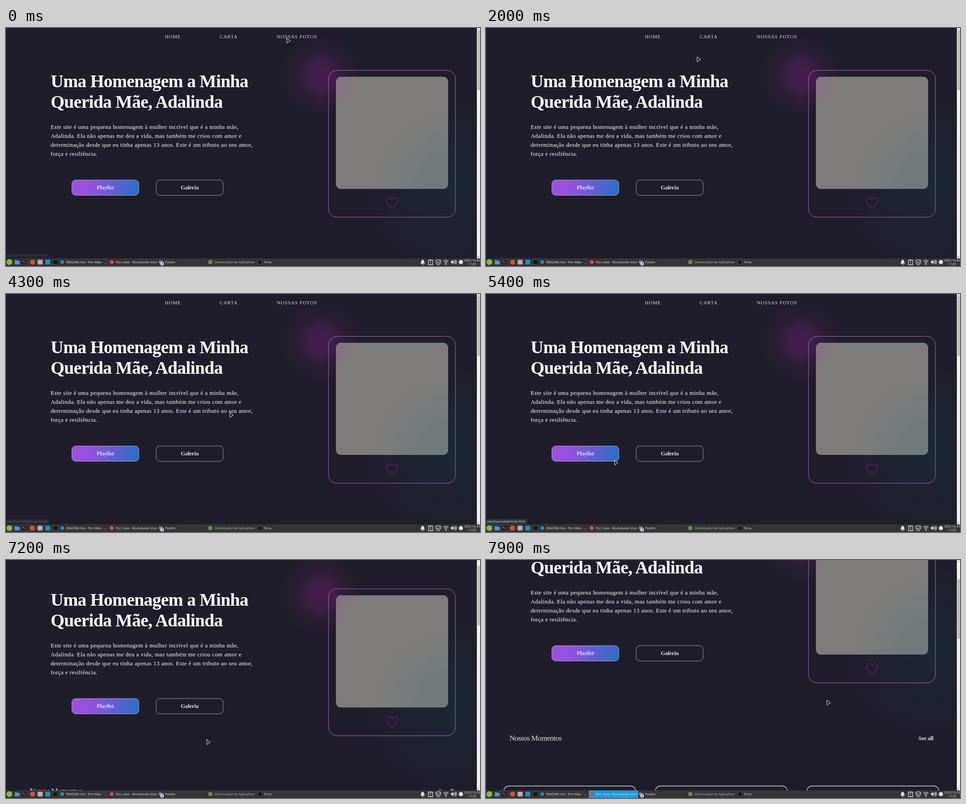
An HTML page that plays this animation: 1056 px wide and 531 px high, repeating every 8 s.

```html
<!DOCTYPE html>
<html lang="pt-BR">
<head>
<meta charset="utf-8">
<style>
html, body { margin: 0; width: 100%; height: 100%; overflow: hidden; background: #201d2b; }
svg { display: block; width: 1056px; height: 531px; }
text { white-space: pre; }
#page { font-family: "Liberation Serif", "Times New Roman", serif; fill: #fff; }
.title { font-size: 39.6px; font-weight: bold; letter-spacing: -.77px; }
.body { font-size: 13.2px; letter-spacing: .365px; }
.link { font-size: 11px; letter-spacing: .9px; fill: #ddd; }
.link.on { fill: #ee82ee; text-decoration: underline; }
.label { font-size: 13.2px; font-weight: bold; letter-spacing: -.4px; fill: #dcd8dd; }
.mid { text-anchor: middle; }
.btn rect { stroke: #d5d3d8; stroke-width: .7; }
.btn.on rect { stroke: #ee82ee; }
.head { font-size: 17px; letter-spacing: -.67px; fill: #ddd; }
#bar, #status { font-family: "Noto Sans", "Open Sans", sans-serif; font-size: 7.2px; fill: #d6d6d6; }
#status { font-family: "Open Sans", "Noto Sans", sans-serif; font-size: 7.1px; }
.clock { font-size: 6.8px; }
.tray { fill: none; stroke: #dedede; stroke-width: 1.3; }
#cursor path { fill: #15131b; stroke: #fff; stroke-width: 1; stroke-linejoin: round; }
</style>
</head>
<body>
<svg viewBox="0 0 1056 531">
  <defs>
    <linearGradient id="fill" gradientUnits="userSpaceOnUse" x1="181" y1="350" x2="287" y2="370">
      <stop stop-color="#9b50e1"/><stop offset="1" stop-color="#306dc8"/>
    </linearGradient>
    <radialGradient id="pink">
      <stop stop-color="#be28be" stop-opacity=".24"/>
      <stop offset="0.3" stop-color="#be28be" stop-opacity=".2"/>
      <stop offset="0.62" stop-color="#be28be" stop-opacity=".07"/>
      <stop offset="1" stop-color="#be28be" stop-opacity="0"/>
    </radialGradient>
    <radialGradient id="teal">
      <stop stop-color="#0a5f82" stop-opacity=".12"/>
      <stop offset="0.3" stop-color="#0a5f82" stop-opacity=".1"/>
      <stop offset="0.65" stop-color="#0a5f82" stop-opacity=".04"/>
      <stop offset="1" stop-color="#0a5f82" stop-opacity="0"/>
    </radialGradient>
  </defs>
  <rect width="1056" height="531" fill="#201d2b"/>

  <g id="page">
    <text class="link" id="home" x="354" y="23.4">HOME</text>
    <text class="link" id="letter" x="476" y="23.4">CARTA</text>
    <text class="link" id="photos" x="603" y="23.4">NOSSAS FOTOS</text>
    <text class="title" x="99.6" y="132.3">Uma Homenagem a Minha</text>
    <text class="title" x="99.6" y="178.1">Querida Mãe, Adalinda</text>
    <g class="body">
      <text x="99.4" y="224.6">Este site é uma pequena homenagem à mulher incrível que é a minha mãe,</text>
      <text x="99.4" y="244.8">Adalinda. Ela não apenas me deu a vida, mas também me criou com amor e</text>
      <text x="99.4" y="265">determinação desde que eu tinha apenas 13 anos. Este é um tributo ao seu amor,</text>
      <text x="99.4" y="285.2">força e resiliência.</text>
    </g>
    <g class="btn" id="playlist">
      <rect x="146.7" y="339.1" width="149.2" height="34.2" rx="8.5" fill="url(#fill)"/>
      <text class="label mid" x="221.3" y="359.8">Playlist</text>
    </g>
    <g class="btn" id="gallery">
      <rect x="334.5" y="339.1" width="149.2" height="34.2" rx="8.5" fill="none"/>
      <text class="label mid" x="409" y="359.8">Galeria</text>
    </g>
    <rect x="735" y="108.7" width="250" height="250.3" rx="11" fill="#7e7c7a"/>
    <circle cx="702" cy="106" r="88" fill="url(#pink)"/>
    <circle cx="985" cy="350" r="190" fill="url(#teal)"/>
    <rect x="718.6" y="94.5" width="282.6" height="327.6" rx="19" fill="none" stroke="#dc86e0" stroke-width=".75"/>
    <path d="M860 402C852 396 847.3 392 847.3 386.5C847.3 378.5 857 377 860 384C863 377 872.7 378.5 872.7 386.5C872.7 392 868 396 860 402Z" fill="none" stroke="#4b1d5d" stroke-width="2.5" stroke-linejoin="round"/>
    <text class="head" x="52.2" y="550.6">Nossos Momentos</text>
    <text class="label" x="963.3" y="549.6">See all</text>
    <g fill="none" stroke="#f4f4f4" stroke-width="1.1">
      <rect x="39.5" y="652.4" width="294" height="240" rx="11"/>
      <rect x="377.3" y="652.4" width="294" height="240" rx="11"/>
      <rect x="715" y="652.4" width="294" height="240" rx="11"/>
    </g>
  </g>

  <rect x="1049" width="7" height="514" fill="#f1f1f1"/>
  <path d="M1050.8 3.4l1.8-2 1.8 2zM1050.8 509.5l1.8 2 1.8-2z" fill="#555"/>
  <rect id="thumb" x="1050" y="5.2" width="6" height="133" fill="#bfbfbf"/>

  <g id="status">
    <path id="bubble" fill="#2c343c"/>
    <text id="url" x="2" y="510.2" fill="#d8dade"/>
  </g>

  <g id="bar">
    <rect y="514" width="1056" height="17" fill="#353535"/>
    <rect id="active" x="229" y="514" width="110" height="17" fill="#1f9ade"/>
    <circle cx="7.5" cy="522.3" r="6.3" fill="#86be43"/>
    <path d="M19.5 518h4.5l1.2 1.5h5.3v7.8h-11z" fill="#4f95e6"/>
    <rect x="36" y="517" width="11" height="10.5" rx="1.5" fill="#22262b"/>
    <path d="M38 519.5l2 1.4-2 1.4M41 523h2.5" fill="none" stroke="#ddd" stroke-width=".8"/>
    <circle cx="59" cy="522.3" r="5.5" fill="#dc4b3e"/>
    <rect x="70.5" y="517" width="11" height="10.5" rx="1.5" fill="#b9b0a4"/>
    <rect x="88" y="517" width="10.5" height="10.5" rx="1" fill="#2489ca"/>
    <rect x="105" y="517" width="10.5" height="10.5" rx="1" fill="#151515" stroke="#8a6a60" stroke-width=".6"/>
    <rect x="121.5" y="518.5" width="7.5" height="7.5" rx="1" fill="#2489ca"/>
    <text x="134.3" y="525">README.md - Flor-Mae - …</text>
    <circle cx="235.5" cy="522.3" r="4.3" fill="#dc4b3e"/>
    <text x="244.3" y="525">Flor_mae - Mundovela Visor</text>
    <path d="M341 518.5h3.5l1 1.2h4.5v6h-9z" fill="#4f95e6"/>
    <circle cx="347.7" cy="526" r="3.9" fill="#ececec"/>
    <text class="mid" x="347.7" y="528.4" style="font-size:6.5px;font-weight:bold;fill:#222">2</text>
    <text x="354.5" y="525">Pastim</text>
    <rect x="451.3" y="518.2" width="8" height="8" rx="1" fill="#7fa65a"/>
    <path d="M453 520.5h4.6M453 522.3h4.6M453 524.1h4.6" stroke="#33452a" stroke-width=".7"/>
    <text x="464.5" y="525" fill="#b4b4b4">Gerenciador de Aplicativos</text>
    <rect x="561.5" y="518.5" width="8" height="8" rx="1" fill="#151515" stroke="#8a4a58" stroke-width=".6"/>
    <text x="574.5" y="525">Tecla</text>
    <path d="M923 526c1.8-1.5 1.7-3 1.9-5 .3-5 6.4-5 6.7 0 .2 2 .1 3.5 1.9 5zM926.6 527a1.7 1.7 0 0 0 3.4 0z" fill="#dedede"/>
    <g class="tray">
      <path d="M941 518h9.8v10h-9.8zM943.7 517.3h4.4M945.9 520v4M945.9 525.2v1.2"/>
      <path d="M963 516.8c2 1.3 3.6 1.6 5.6 1.7 0 5-1.6 8-5.6 10-4-2-5.6-5-5.6-10 2-.1 3.6-.4 5.6-1.7zM960.8 522l1.8 2 3-3.7"/>
      <path d="M974.5 520.5q5.5-4.6 11 0M976.5 523q3.5-3 7 0M978.5 525.4q1.5-1.2 3 0"/>
      <path d="M998 520q1.7 2.3 0 4.6M999.8 518.6q3 3.7 0 7.4M1001.6 517.2q4 5.1 0 10.2"/>
    </g>
    <path d="M991 520.3h2.3l3.2-3v10l-3.2-3h-2.3z" fill="#dedede"/>
    <circle cx="980" cy="527" r="1.2" fill="#dedede"/>
    <circle cx="1013.5" cy="522.3" r="4.8" fill="#dedede"/>
    <text class="clock mid" x="1038.5" y="521.2">2023-10-05</text>
    <text class="clock mid" x="1038.5" y="529.3">11:25</text>
  </g>

  <g id="cursor">
    <path id="arrow" d="M.6 .8L8 6.3Q8.5 7.3 7.2 7.6L4.4 8.2 2 11.3Q.7 12 .6 10.5Z"/>
    <path id="hand" d="M-1 1.2Q-1 .2 0 .2T1 1.2V4.3Q1.8 3.7 2.4 4.5 3.2 4 3.8 4.9 5.6 4.8 5.5 6.5V8.5Q5.5 11.6 2.8 11.6H1Q-.8 11.6-1.8 9.8L-3.2 7.3Q-3.4 6.3-2.4 6.2L-1 7.2Z"/>
  </g>
</svg>
<script>
const $ = id => document.getElementById(id);
const LOOP = 8000, STEP = 100;

// time, x, y of the pointer tip
const path = [
  [100, 625, 22], [700, 652, 19], [800, 652, 19], [1100, 585, 21], [1300, 539, 95],
  [1800, 539, 95], [2300, 366, 17], [2400, 366, 17], [2500, 365, 15], [2900, 365, 15],
  [3000, 487, 16], [3500, 655, 15], [3700, 655, 15], [4600, 420, 388], [4800, 405, 360],
  [5200, 405, 360], [5400, 286, 370], [5500, 264, 360], [6200, 264, 360], [6400, 324, 398],
  [6600, 324, 398], [6800, 447, 400], [7700, 447, 400], [7900, 759, 312]
];
// element, hover start, hover end
const hovers = [
  ['photos', 200, 1200], ['home', 2300, 3000], ['letter', 3000, 3100],
  ['photos', 3300, 4000], ['gallery', 4800, 5300], ['playlist', 5500, 6300]
];
// time, status opacity
const fades = [
  [0, .2], [200, 0], [900, 1], [1500, .4], [1600, 0], [2500, .2], [3000, 1],
  [4300, .4], [4400, 0], [5000, .4], [5100, 1], [6700, .4], [6800, 0]
];
const links = [...new Set(hovers.map(h => h[0]))];

function pointer(t) {
  const i = path.findIndex(p => p[0] >= t);
  if (i < 1) return path[i < 0 ? path.length - 1 : 0].slice(1);
  const a = path[i - 1], b = path[i], k = (t - a[0]) / (b[0] - a[0]);
  return [a[1] + (b[1] - a[1]) * k, a[2] + (b[2] - a[2]) * k];
}

function draw(t) {
  const scroll = Math.round(148 * Math.min(1, Math.max(0, (t - 7100) / 500)));
  $('page').setAttribute('transform', `translate(0 ${-scroll})`);
  $('thumb').setAttribute('y', 5.2 + scroll * .257);
  $('active').style.display = t >= 7600 ? '' : 'none';

  const hover = hovers.find(h => t >= h[1] && t < h[2]);
  for (const id of links) $(id).classList.toggle('on', !!hover && hover[0] === id);
  const hand = hover && !(t >= 5500 && t < 5700);
  $('hand').style.display = hand ? '' : 'none';
  $('arrow').style.display = hand ? 'none' : '';
  $('cursor').setAttribute('transform', `translate(${pointer(t)})`);

  const nav = t < 4700;
  $('status').style.opacity = fades.filter(f => f[0] <= t).pop()[1];
  $('url').textContent = 'casinha.invalid/inicio.html' + (nav ? '#' : '');
  $('bubble').setAttribute('d', `M0 502H${nav ? 94.5 : 90}q2 0 2 2V514H0Z`);
}

function tick() {
  draw(Math.floor(performance.now() % LOOP / STEP) * STEP);
  requestAnimationFrame(tick);
}
tick();
</script>
</body>
</html>
```
